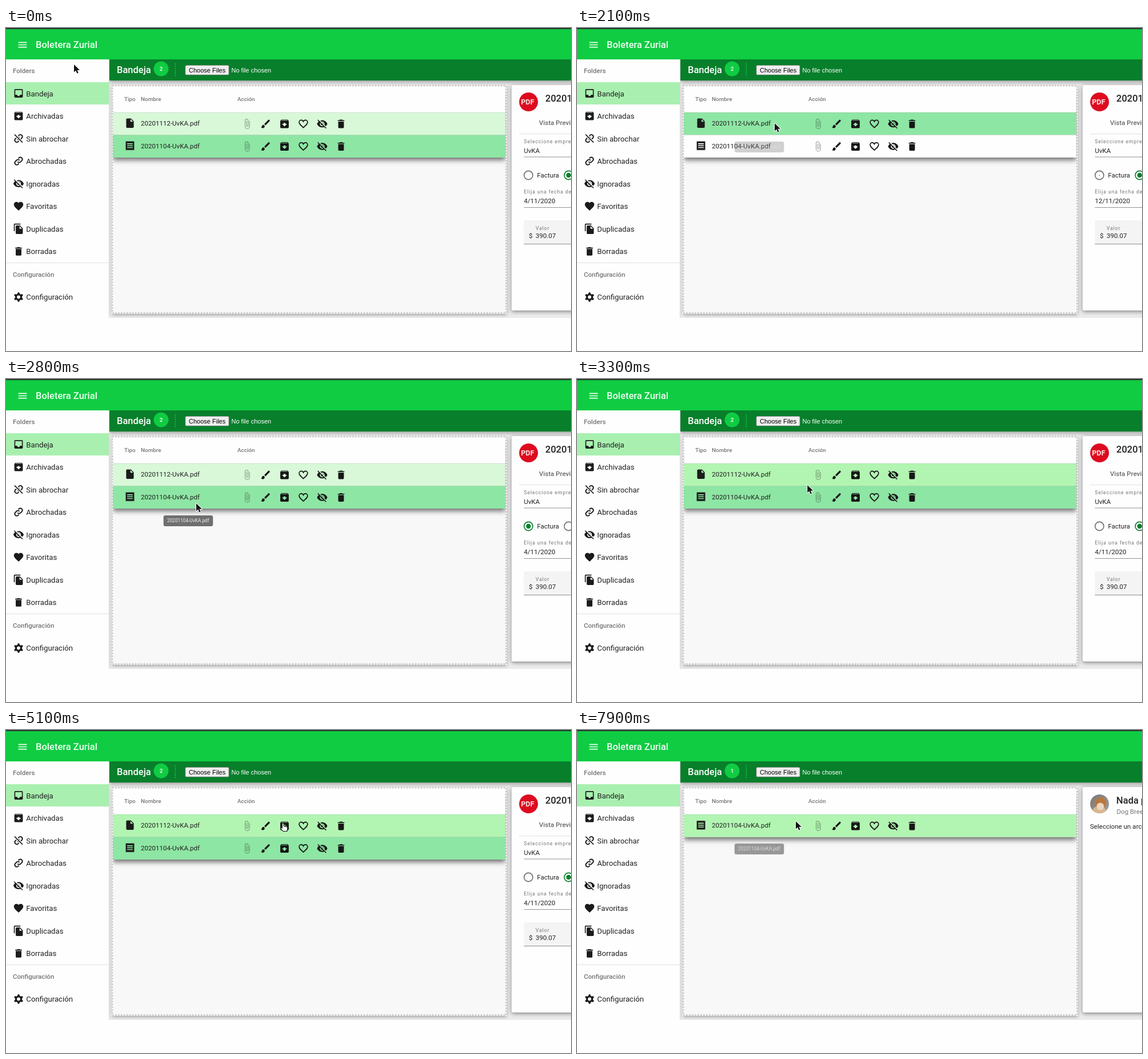
These frames come from a looping animation (989 px wide and 566 px high, 8000 ms). An HTML page with a canvas:

```html
<!DOCTYPE html>
<html lang="es">
<head>
<meta charset="utf-8">
<title>Bandeja</title>
<style>
html, body { margin: 0; width: 100%; height: 100%; overflow: hidden; background: #fefefe; }
canvas { display: block; }
</style>
</head>
<body>
<canvas id="stage" width="989" height="566"></canvas>
<script>
const ctx = document.getElementById('stage').getContext('2d');
const LOOP = 8000, STEP = 100;
const GREEN = '#0fcc43', DARK = '#087f2b', INK = '#212121', GREY = '#757575';
const TINT = '#d8f8d8', HOVER = '#b2f5b2', SELECTED = '#8ee6a4';

const paths = {
  menu: 'M3 18h18v-2H3v2zm0-5h18v-2H3v2zm0-7v2h18V6H3z',
  inbox: 'M19 3H5c-1.1 0-2 .9-2 2v14c0 1.1.9 2 2 2h14c1.1 0 2-.9 2-2V5c0-1.1-.9-2-2-2zm0 12h-4c0 1.66-1.35 3-3 3s-3-1.34-3-3H5V5h14v10z',
  archive: 'M20.54 5.23l-1.39-1.68C18.88 3.21 18.47 3 18 3H6c-.47 0-.88.21-1.16.55L3.46 5.23C3.17 5.57 3 6.02 3 6.5V19c0 1.1.9 2 2 2h14c1.1 0 2-.9 2-2V6.5c0-.48-.17-.93-.46-1.27zM12 17.5L6.5 12H10v-2h4v2h3.5L12 17.5zM5.12 5l.81-1h12l.94 1H5.12z',
  hidden: 'M12 7c2.76 0 5 2.24 5 5 0 .65-.13 1.26-.36 1.83l2.92 2.92c1.51-1.26 2.7-2.89 3.43-4.75-1.73-4.39-6-7.5-11-7.5-1.4 0-2.74.25-3.98.7l2.16 2.16C10.74 7.13 11.35 7 12 7zM2 4.27l2.74 2.74C3.08 8.3 1.78 10.02 1 12c1.73 4.39 6 7.5 11 7.5 1.55 0 3.03-.3 4.38-.84L19.73 22 21 20.73 3.27 3 2 4.27zM7.53 9.8l1.55 1.55c-.05.21-.08.43-.08.65 0 1.66 1.34 3 3 3 .22 0 .44-.03.65-.08l1.55 1.55c-.67.33-1.41.53-2.2.53-2.76 0-5-2.24-5-5 0-.79.2-1.53.53-2.2zm4.31-.78l3.15 3.15.02-.16c0-1.66-1.34-3-3-3l-.17.01z',
  heart: 'M12 21.35l-1.45-1.32C5.4 15.36 2 12.28 2 8.5 2 5.42 4.42 3 7.5 3c1.74 0 3.41.81 4.5 2.09C13.09 3.81 14.76 3 16.5 3 19.58 3 22 5.42 22 8.5c0 3.78-3.4 6.86-8.55 11.54L12 21.35z',
  outline: 'M12 20C5.8 14.4 3 11.9 3 8.5 3 6 5 4 7.5 4 9.3 4 11.2 5.2 12 7 12.8 5.2 14.7 4 16.5 4 19 4 21 6 21 8.5 21 11.9 18.2 14.4 12 20z',
  trash: 'M6 19c0 1.1.9 2 2 2h8c1.1 0 2-.9 2-2V7H6v12zM19 4h-3.5l-1-1h-5l-1 1H5v2h14V4z',
  copy: 'M16 1H4c-1.1 0-2 .9-2 2v14h2V3h12V1zm-1 4l6 6v10c0 1.1-.9 2-2 2H8c-1.1 0-2-.9-2-2V7c0-1.1.9-2 2-2h7zm-1 7h5.5L14 6.5V12z',
  link: 'M10 13.5a4.1 4.1 0 0 0 6 .5l3.2-3.2a4.3 4.3 0 0 0-6-6l-1.8 1.8M14 10.5a4.1 4.1 0 0 0-6-.5l-3.2 3.2a4.3 4.3 0 0 0 6 6l1.8-1.8',
  slash: 'M3.5 3.5l17 17',
  file: 'M6 2c-1.1 0-2 .9-2 2v16c0 1.1.9 2 2 2h12c1.1 0 2-.9 2-2V8l-6-6H6zm7 7V3.5L18.5 9H13z',
  receipt: 'M18 17H6v-2h12v2zm0-4H6v-2h12v2zm0-4H6V7h12v2zM3 22l1.5-1.5L6 22l1.5-1.5L9 22l1.5-1.5L12 22l1.5-1.5L15 22l1.5-1.5L18 22l1.5-1.5L21 22V2l-1.5 1.5L18 2l-1.5 1.5L15 2l-1.5 1.5L12 2l-1.5 1.5L9 2 7.5 3.5 6 2 4.5 3.5 3 2v20z',
  brush: 'M7 14c-1.66 0-3 1.34-3 3 0 1.31-1.16 2-2 2 .92 1.22 2.49 2 4 2 2.21 0 4-1.79 4-4 0-1.66-1.34-3-3-3zm13.71-9.37l-1.34-1.34c-.39-.39-1.02-.39-1.41 0L9 12.25 11.75 15l8.96-8.96c.39-.39.39-1.02 0-1.41z',
  clip: 'M17.2 6v11.5a4.7 4.7 0 0 1-9.4 0V5a3.2 3.2 0 0 1 6.4 0v10.5a1.7 1.7 0 0 1-3.4 0V6',
  arrow: 'M0 0V13.5L3.2 10.6 5.4 15.4 7.7 14.4 5.5 9.7H10Z',
  beam: 'M-2.5-6.5Q0-6.5 0-5V5Q0 6.5-2.5 6.5M2.5-6.5Q0-6.5 0-5V5Q0 6.5 2.5 6.5',
  hand: 'M-1.4.6Q0-1.2 1.4.6V5L6.6 6.2Q8.3 6.8 8.1 9L7.2 14H.4L-4 9.4Q-4.6 7.6-3 7.7L-1.4 9Z'
};
const shapes = Object.fromEntries(Object.entries(paths).map(([k, d]) => [k, new Path2D(d)]));
shapes.gear = gear();

function gear() {
  const p = new Path2D();
  for (let i = 0; i < 24; i++) {
    const r = i % 4 < 2 ? 10.2 : 7.3;
    const a = (Math.floor(i / 2) + (i % 2 ? 0.26 : -0.26)) * Math.PI / 6 + Math.PI / 6;
    p.lineTo(12 + r * Math.cos(a), 12 + r * Math.sin(a));
  }
  p.closePath();
  p.moveTo(15.5, 12);
  p.arc(12, 12, 3.5, 0, 7, true);
  return p;
}

function text(str, x, y, size = 11.55, color = INK, weight = 400, spacing = 0, font = 'Roboto') {
  ctx.font = `${weight} ${size}px ${font}, sans-serif`;
  ctx.letterSpacing = spacing + 'px';
  ctx.fillStyle = color;
  ctx.fillText(str, x, y);
}

function rect(x, y, w, h, color) {
  ctx.fillStyle = color;
  ctx.fillRect(x, y, w, h);
}

function round(x, y, w, h, r, color) {
  ctx.fillStyle = color;
  ctx.beginPath();
  ctx.roundRect(x, y, w, h, r);
  ctx.fill();
}

function disc(x, y, r, color) {
  ctx.fillStyle = color;
  ctx.beginPath();
  ctx.arc(x, y, r, 0, 7);
  ctx.fill();
}

function shadow(blur, dy, alpha, paint) {
  ctx.save();
  ctx.shadowColor = `rgba(0,0,0,${alpha})`;
  ctx.shadowBlur = blur;
  ctx.shadowOffsetY = dy;
  paint();
  ctx.restore();
}

// Icons live on a 24 unit grid and are centred on x, y.
function icon(name, x, y, color = '#1b1b1b', line = 0) {
  ctx.save();
  ctx.translate(x - 9.9, y - 9.9);
  ctx.scale(0.825, 0.825);
  if (line) {
    ctx.strokeStyle = color;
    ctx.lineWidth = line;
    ctx.stroke(shapes[name]);
  } else {
    ctx.fillStyle = color;
    ctx.fill(shapes[name], 'evenodd');
  }
  ctx.restore();
}

const menu = [
  ['Bandeja', 'inbox'], ['Archivadas', 'archive'], ['Sin abrochar', 'unlink'], ['Abrochadas', 'link'],
  ['Ignoradas', 'hidden'], ['Favoritas', 'heart'], ['Duplicadas', 'copy'], ['Borradas', 'trash']
];

function sidebar() {
  rect(0, 55, 180, 453, '#fefefe');
  rect(0, 95, 180, 39, '#a9f0b0');
  text('Folders', 12, 79, 11.55, GREY, 500);
  menu.forEach(([label, name], i) => {
    const y = 114.5 + i * 39.55;
    if (name.endsWith('link')) {
      icon('link', 22, y, '#1b1b1b', 2.3);
      if (name === 'unlink') {
        icon('slash', 22, y, '#fefefe', 5);
        icon('slash', 22, y, '#1b1b1b', 2);
      }
    } else icon(name, 22, y);
    text(label, 35.3, y + 5, 13.2);
  });
  rect(0, 411, 180, 1, '#e0e0e0');
  text('Configuración', 12, 436, 11.55, GREY, 500);
  icon('gear', 22, 471.5);
  text('Configuración', 35.3, 476, 13.2);
  rect(180, 55, 1, 453, '#d8d8d8');
}

function header(count) {
  shadow(7, 2, 0.4, () => rect(181, 55, 820, 37, DARK));
  rect(0, 2, 989, 53, GREEN);
  rect(0, 0, 989, 2, '#26382c');
  icon('menu', 29, 29.5, '#f0fff2');
  text('Boletera Zurial', 52, 34.5, 16.5, '#f0fff2', 500);
  text('Bandeja', 194, 79, 16.5, '#fff', 500);
  disc(271.5, 71.5, 13, GREEN);
  text(count, 268.7, 75, 9.9, '#fff', 500);
  for (let y = 62; y < 85; y += 4) rect(295.5, y, 1.6, 2, GREEN);
  round(313.5, 65, 77, 17.5, 2, '#767676');
  round(314.3, 65.8, 75.4, 15.9, 1.5, '#efefef');
  text('Choose Files', 320, 77.5, 11, '#000', 400, 0, 'Liberation Sans');
  text('No file chosen', 394.5, 77.5, 11, '#fff', 400, 0, 'Liberation Sans');
}

function row(y, name, type, color) {
  rect(187, y, 687, 39.5, color);
  rect(187, y - 0.5, 687, 1, 'rgba(0,0,0,.1)');
  icon(type, 217, y + 18.7);
  text(name, 236, y + 23.3);
  const cy = y + 20;
  icon('clip', 422, cy, 'rgba(0,0,0,.3)', 1.6);
  ['brush', 'archive', 'outline', 'hidden', 'trash'].forEach((n, i) =>
    icon(n, 454.5 + i * 33, cy, '#161616', n === 'outline' ? 2 : 0));
}

const first = '20201112-UvKA.pdf', second = '20201104-UvKA.pdf';

function list(t, y, removed) {
  shadow(6, 2, 0.4, () => rect(186, 101, 690, 399, '#f8f8f8'));
  ctx.strokeStyle = '#f4f4f4';
  ctx.lineWidth = 3;
  ctx.strokeRect(186, 101, 689.5, 398.5);
  ctx.strokeStyle = '#c6c6c6';
  ctx.lineWidth = 2.4;
  ctx.setLineDash([2.5, 2.5]);
  ctx.strokeRect(186, 101, 689.5, 398.5);
  ctx.setLineDash([]);

  const bottom = removed ? 187.5 : 227;
  ctx.save();
  ctx.beginPath();
  ctx.rect(187.5, 102.5, 687, 396);
  ctx.clip();
  shadow(9, 4, 0.6, () => rect(187, 110, 687, bottom - 110, '#fefefe'));
  rect(187, 102.5, 687, 30, '#fefefe');
  ctx.restore();
  text('Tipo', 207, 128, 9.9, GREY, 500);
  text('Nombre', 236, 128, 9.9, GREY, 500);
  text('Acción', 405, 128, 9.9, GREY, 500);

  const over = y > 148 && y < 187.5 ? 0 : y >= 187.5 && y < 227 ? 1 : -1;
  if (removed) return row(148, second, 'receipt', over === 0 ? HOVER : '#fefefe');
  const sel = t >= 2100 && t < 2800 ? 0 : 1;
  const paint = (i, base) => sel === i ? SELECTED : over === i ? HOVER : base;
  row(148, first, 'file', paint(0, TINT));
  row(187.5, second, 'receipt', paint(1, '#fefefe'));
}

function radio(x, dot) {
  const on = dot > 0.5;
  ctx.strokeStyle = on ? DARK : '#707070';
  ctx.lineWidth = 1.65;
  ctx.beginPath();
  ctx.arc(x, 258, 7.6, 0, 7);
  ctx.stroke();
  if (dot) disc(x, 258, 4.2 * dot, on ? DARK : '#555');
}

function form(t) {
  const isFirst = t >= 2100 && t < 2800;
  disc(914.7, 129.5, 16.5, '#dd0b20');
  text('PDF', 901.5, 134, 12.5, '#ffe4e4', 700);
  text(isFirst ? first : second, 944, 128.5, 16.5, INK, 500);
  text('Vista Previa', 933, 170, 11.55, '#686868', 500);
  rect(898, 185, 91, 1, '#e0e0e0');
  text('Seleccione empresa', 906.5, 202, 8.66, GREY, 400, 0.9);
  text('UvKA', 906.5, 219);
  rect(906.5, 225.5, 83, 1, '#949494');
  const invoice = t < 2100 || t >= 3000 ? 0 : t < 2200 ? 0.2 : 1;
  const other = t < 2200 || t >= 3000 ? 1 : t >= 2900 ? 0.2 : 0;
  radio(914.5, invoice);
  text('Factura', 929.5, 262);
  radio(984.8, other);
  text('Elija una fecha de pago', 906.5, 290, 8.66, GREY, 400, 0.9);
  text(isFirst ? '12/11/2020' : '4/11/2020', 906.5, 307);
  rect(906.5, 314, 83, 1, '#949494');
  round(906.5, 337, 90, 41.5, [3, 3, 0, 0], '#f4f4f4');
  rect(906.5, 378, 83, 1, '#8c8c8c');
  text('Valor', 927, 353.5, 8.66, GREY, 400, 0.9);
  text('$', 915.3, 368.3);
  text('390.07', 927, 368.3);
}

function empty() {
  ctx.save();
  ctx.beginPath();
  ctx.arc(914.7, 129.5, 16.5, 0, 7);
  ctx.clip();
  const g = ctx.createLinearGradient(898, 113, 931, 146);
  g.addColorStop(0, '#77787a');
  g.addColorStop(1, '#a59c92');
  rect(897, 112, 36, 36, g);
  disc(914, 146, 13, '#d9b68f');
  disc(916, 128, 10, '#b9773f');
  disc(916, 134, 6.5, '#ead7c0');
  ctx.restore();
  text('Nada por aquí', 944, 128.5, 16.5, INK, 500);
  text('Dog Breed', 944.5, 146.5, 11.55, GREY);
  text('Seleccione un archivo', 898, 173);
}

function card(t, removed) {
  shadow(7, 2, 0.45, () => round(885, 100, 120, 395, 3, '#fefefe'));
  removed ? empty() : form(t);
}

function tip(label, y, alpha, scale = 1) {
  ctx.save();
  ctx.globalAlpha = alpha * 0.9;
  ctx.translate(319, y);
  ctx.scale(scale, scale);
  round(-43.3, 0, 86.6, 19, 3.3, '#616161');
  text(label, -37, 12.4, 8.25, '#fff');
  ctx.restore();
}

function tips(t) {
  if (t >= 1000 && t <= 2100) {
    const alpha = t > 2000 ? 0.33 : t < 1100 ? 0.27 : t < 1200 ? 0.75 : t < 1400 ? 0.95 : 1;
    tip(first, 199, alpha, t < 1100 ? 0.53 : 1);
  }
  if (t >= 2600 && t <= 2900) tip(second, 239, t < 2700 ? 0.5 : t > 2800 ? 0.33 : 1);
  if (t >= 7900) tip(second, 199, 0.7);
}

// Time, x and y of the pointer.
const track = [
  [600, 119, 64], [800, 185, 104], [1000, 288, 158], [1200, 346, 167], [2100, 346, 167],
  [2300, 345, 180], [2700, 333, 218], [2900, 333, 218], [3100, 350, 206], [3400, 430, 176],
  [3800, 491, 165], [4000, 489, 164], [4100, 489, 164], [4300, 487, 164], [4400, 487, 164],
  [4900, 484, 163], [5400, 486, 164], [7700, 486, 164], [7900, 383, 160]
];

function pointer(t) {
  const i = track.findIndex(k => k[0] >= t);
  if (i === 0) return track[0].slice(1);
  if (i < 0) return track[track.length - 1].slice(1);
  const [t0, x0, y0] = track[i - 1], [t1, x1, y1] = track[i];
  const k = (t - t0) / (t1 - t0);
  return [x0 + (x1 - x0) * k, y0 + (y1 - y0) * k];
}

function cursor(x, y) {
  const near = Math.abs(y - 167) < 11 || Math.abs(y - 207) < 11;
  const kind = near && x > 440 && x < 596 ? 'hand' : near && x > 236 && x < 338 ? 'beam' : 'arrow';
  ctx.save();
  ctx.translate(x, y);
  ctx.lineJoin = 'round';
  const line = (w, color) => {
    ctx.lineWidth = w;
    ctx.strokeStyle = color;
    ctx.stroke(shapes[kind]);
  };
  line(kind === 'hand' ? 1.2 : 2, kind === 'hand' ? '#111' : '#fff');
  if (kind === 'beam') line(1, '#222');
  else {
    ctx.fillStyle = kind === 'hand' ? '#f4fff4' : '#111';
    ctx.fill(shapes[kind]);
  }
  if (kind === 'hand') line(1, '#111');
  ctx.restore();
}

function draw(t) {
  const [x, y] = pointer(t), removed = t >= 6900;
  rect(0, 0, 989, 566, '#fefefe');
  rect(181, 92, 808, 416, '#ebebeb');
  header(removed ? '1' : '2');
  sidebar();
  list(t, y, removed);
  card(t, removed);
  if (t >= 6500 && !removed) disc(487.5, 167.5, t < 6600 ? 14.5 : 16, 'rgba(0,0,0,.14)');
  tips(t);
  cursor(x, y);
}

const start = performance.now();
function frame() {
  const t = (performance.now() - start) % LOOP;
  draw(Math.floor(t / STEP) * STEP);
  requestAnimationFrame(frame);
}
frame();
</script>
</body>
</html>
```
